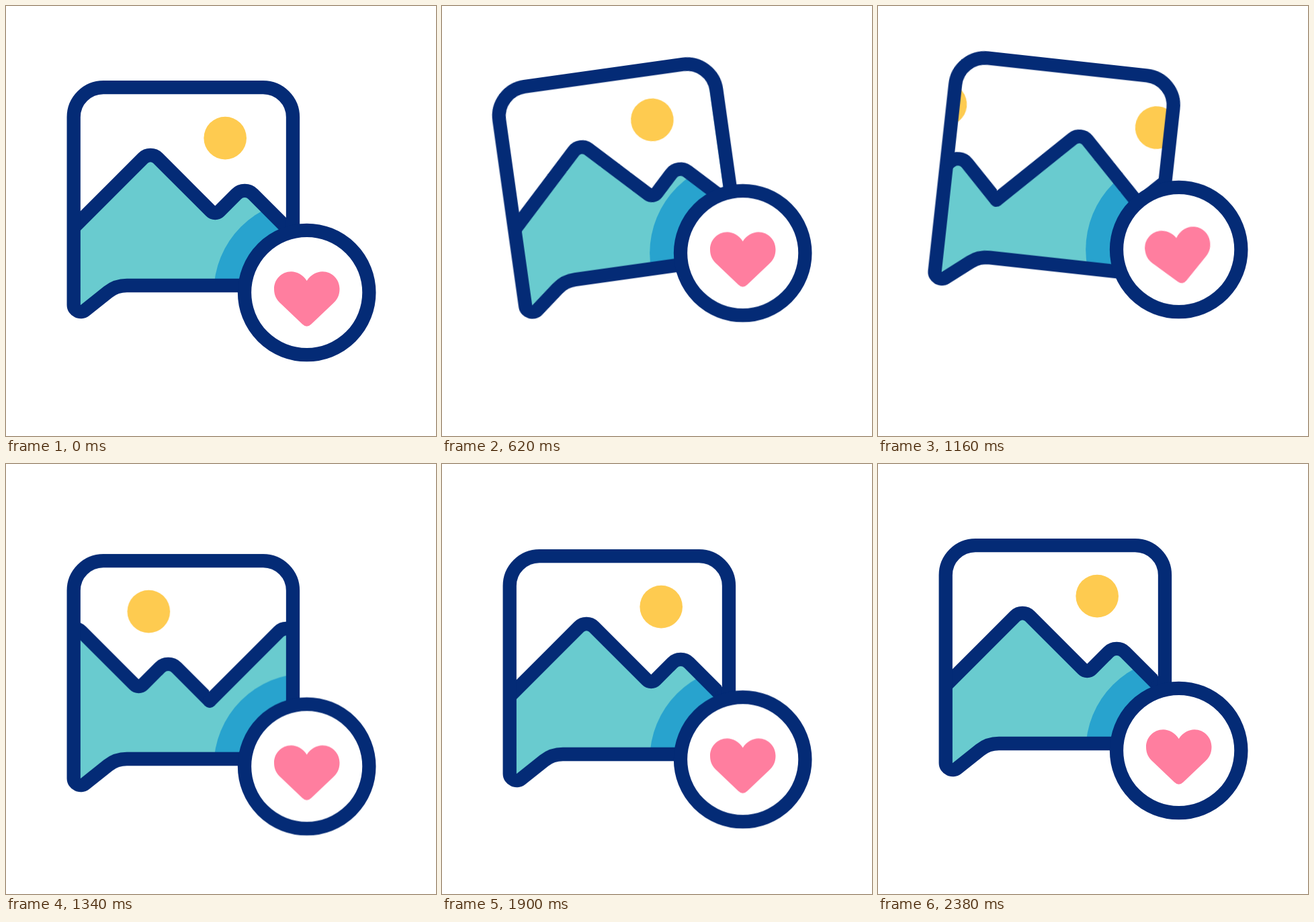
These frames come from a looping animation (640 px wide and 640 px high, 2520 ms). An HTML page without scripts:

```html
<!DOCTYPE html>
<html lang="en">
<head>
<meta charset="utf-8">
<title>Picture like</title>
<style>
  html, body { margin: 0; width: 100%; height: 100%; overflow: hidden; background: #fff; }
  svg { display: block; width: 100%; height: 100%; }

  .lift, .tilt, .pan, .badge, .heart {
    animation: 2520ms cubic-bezier(.333, 0, .667, 1) infinite;
  }
  .lift  { animation-name: lift; }
  .tilt  { animation-name: tilt; transform-origin: 264px 288px; }
  .pan   { animation-name: pan; }
  .badge { animation-name: badge; }
  .heart { animation-name: wobble; transform-origin: 448px 436px; }

  .line { fill: none; stroke: #042b76; stroke-width: 20.3; stroke-linecap: round; stroke-linejoin: round; }

  /* crouch, jump, land, bounce, settle */
  @keyframes lift {
    0%, 7.937% { transform: translateY(0); }
    14.683% { transform: translateY(25px); animation-timing-function: cubic-bezier(.333, .667, .667, 1); }
    43.254% { transform: translateY(-52px); }
    51.587% { transform: translateY(25px); }
    64.484% { transform: translateY(-23px); }
    75.794% { transform: translateY(16px); }
    94.444%, 100% { transform: translateY(0); }
  }
  @keyframes badge {
    0%, 7.937% { transform: translateY(0); }
    13.095% { transform: translateY(26px); animation-timing-function: cubic-bezier(.333, .833, .667, 1); }
    43.254% { transform: translateY(-96.5px); }
    51.587% { transform: translateY(26px); }
    63.492% { transform: translateY(-22px); }
    74.603% { transform: translateY(13.3px); }
    94.444%, 100% { transform: translateY(0); }
  }
  @keyframes tilt {
    0%, 14.286% { transform: rotate(0); }
    24.603%, 36.508% { transform: rotate(-8deg); }
    44.048% { transform: rotate(8deg); }
    50.794%, 100% { transform: rotate(0); }
  }
  @keyframes pan {
    0%, 37.341% { transform: translateX(0); }
    64.048%, 100% { transform: translateX(316px); }
  }
  @keyframes wobble {
    0%, 34.921% { transform: rotate(0); }
    39.683% { transform: rotate(8deg); }
    45.238% { transform: rotate(-8deg); }
    50.794%, 100% { transform: rotate(0); }
  }
</style>
</head>
<body>
<svg viewBox="0 0 640 640">
  <defs>
    <g id="scene">
      <path fill="#fff" d="M101 329.5L204 226.5A15.7 15.7 0 0 1 226 226.5L304.9 305.4A9 9 0 0 0 317.7 305.4L342.9 280.1A17.5 17.5 0 0 1 367.7 280.1L417 329.5V0H100V329.5Z"/>
      <path class="line" d="M101 329.5L204 226.5A15.7 15.7 0 0 1 226 226.5L304.9 305.4A9 9 0 0 0 317.7 305.4L342.9 280.1A17.5 17.5 0 0 1 367.7 280.1L417 329.5"/>
      <circle cx="326.2" cy="196.6" r="31.8" fill="#fecb50"/>
    </g>
  </defs>

  <!-- land -->
  <g class="lift"><g class="tilt">
    <rect x="101" y="121" width="326" height="336" fill="#69cbcf"/>
  </g></g>

  <!-- badge shade on the land -->
  <circle class="badge" cx="447.7" cy="426.5" r="138.5" fill="#28a3ce"/>

  <!-- sky, ridge and frame; the frame path also hides everything outside it -->
  <g class="lift"><g class="tilt">
    <g class="pan">
      <use href="#scene" x="-316"/>
      <use href="#scene"/>
    </g>
    <path class="line" style="fill:#fff;fill-rule:evenodd" d="M-900-900H1500V1500H-900ZM180 416C169.500 416 160 419 152 425.500L117.500 453C111 458 100.700 453.500 100.700 445V165.500A44.300 44.300 0 0 1 145 121.200H382.700A44.300 44.300 0 0 1 427 165.500V416Z"/>
  </g></g>

  <g class="badge">
    <circle class="line" style="fill:#fff" cx="447.700" cy="426.500" r="92.700"/>
    <path class="heart" fill="#ff7e9f" d="M447.700 409C442 400 433 395.200 424.500 395.200C410 395.200 399 407 399 421C399 431 402.500 437 409 443L441 473.500Q447.700 480 454.400 473.500L486.500 443C493 437 496.500 431 496.500 421C496.500 407 485.500 395.200 471 395.200C462.500 395.200 453.500 400 447.700 409Z"/>
  </g>
</svg>
</body>
</html>
```
